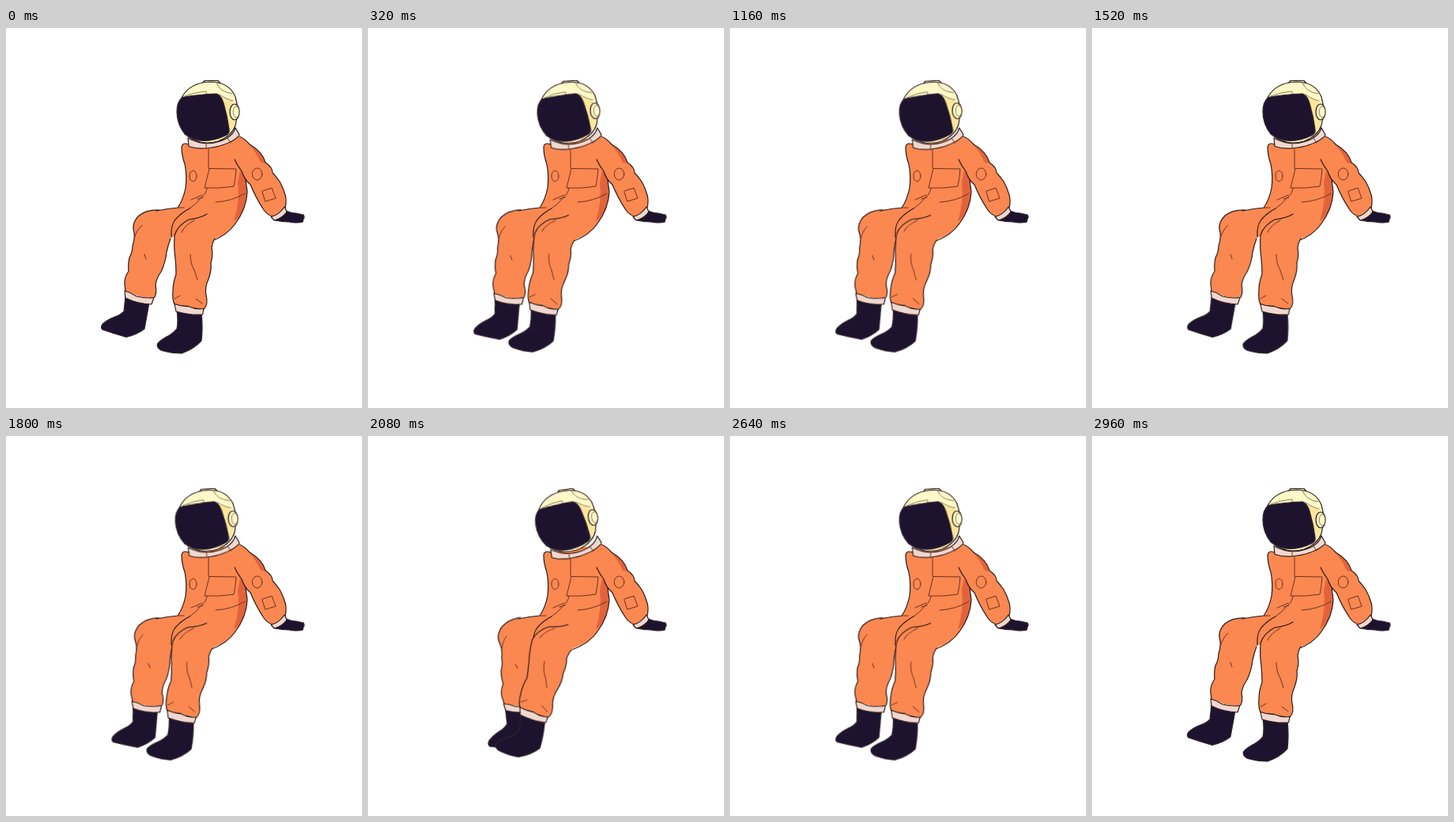
Animation, 450 px wide and 480 px high, one loop 3 s. Source, as an HTML page without scripts:

```html
<!DOCTYPE html>
<html lang="en">
<head>
<meta charset="utf-8">
<title>Sitting astronaut</title>
<style>
html, body { margin: 0; width: 100%; height: 100%; overflow: hidden; background: #fff; }
svg { display: block; width: 450px; height: 480px; }
path, ellipse { stroke-width: 1.2; stroke-linejoin: round; stroke-linecap: round; }
.suit { fill: #fb8850; stroke: none; }
.edge { fill: none; stroke: #2a1b1a; }
.fine { fill: none; stroke: #6b3323; stroke-width: 1; }
.shade { fill: #e2633b; stroke: none; }
.cuff { fill: #f1d8cf; stroke: #2a1b1a; }
.dark { fill: #1e132e; stroke: #30242b; }
.shell { fill: #fff8c8; stroke: #2a1b1a; }
.glow { fill: #fce69b; stroke: none; }
.trim { fill: none; stroke: #8d8058; stroke-width: 1; }

/* two swings of 1480 ms, then a 40 ms rest */
.swing { animation: swing 3s cubic-bezier(.364, 0, .636, 1) infinite; }
.leg-l { --turn: -13.4deg; transform-origin: 190px 236px; }
.leg-r { --turn: 11.3deg; transform-origin: 236px 230px; }
.head { --turn: -8deg; transform-origin: 262px 140px; }
.collar { --turn: -4.5deg; transform-origin: 292px 131px; }
@keyframes swing {
  0%, 49.333%, 98.667%, 100% { transform: rotate(0deg); }
  24.667%, 74% { transform: rotate(var(--turn)); }
}
</style>
</head>
<body>
<svg viewBox="0 0 450 480">
  <g class="swing leg-l">
    <path class="dark" d="M151 339L149 358Q144 363 137 365Q127 369 122 374Q119 378 122 381Q136 386 152 390.500Q166 387 175 380Q178 364 181 347Z"/>
    <path class="suit" d="M194 230Q178 229 168 237Q160 245 161 254Q164 264 160 275Q160 283 156 290Q154 299 155 307Q149 316 150 324L151 333Q160 335 168 339Q179 342 188 340Q191 334 189 325Q190 316 196 308Q202 295 203 283Q205 274 208 266L207 243Z"/>
    <path class="edge" d="M194 230Q178 229 168 237Q160 245 161 254Q164 264 160 275Q160 283 156 290Q154 299 155 307Q149 316 150 324L151 333M188 340Q191 334 189 325Q190 316 196 308Q202 295 203 283Q205 274 208 266"/>
    <path class="cuff" d="M150 332Q158 334 165 339Q177 342 187 340.500L184 349Q166 348.500 151 341Z"/>
    <path class="fine" d="M175 286L177 292M162 266Q165 255 172 249"/>
  </g>

  <path class="suit" d="M231 147Q223 144 222 150Q222 161 226 172Q229 187 227 202Q224 217 217 227Q204 228 191 231L189 240L209 265L214 262L230 268H259Q280 262 290 247Q304 228 305 207L303 192L309 198Q316 215 326 230Q331 237 338 238L353 227Q355 218 353 211Q350 201 346 194Q341 187 337 183Q337 176 328 170Q324 156 308 147Q301 139 295 137Z"/>
  <path class="shade" d="M303 192Q307 213 300 230Q296 239 288 244Q296 218 293 195L296 180ZM307 147Q324 156 328 171L322 170Q317 158 307 147Z"/>
  <path class="edge" d="M231 147Q223 144 222 150Q222 161 226 172Q229 187 227 202Q224 217 217 227Q204 228 190 231M258 270Q280 262 290 247Q304 228 305 207L303 192M295 137Q301 139 308 147Q324 156 328 170Q337 176 337 183Q341 187 346 194Q350 201 353 211Q355 218 353 227M338 238Q331 237 326 230Q316 215 309 198Q301 191 298 181Q292 173 289 166"/>
  <path class="fine" d="M256 153V177M257 177.500L291 178Q290 190 288 200Q270 203 251 202Q254 190 257 177.500ZM254 202Q253 210 247 214Q240 223 232 228M248 211L234 217M249 214L242 216M302 209Q285 219 265 220M217 227L225 227M324 206L336 202L341 215L328 219Z"/>
  <ellipse class="fine" cx="236.500" cy="187" rx="4.500" ry="6.800"/>
  <ellipse class="fine" cx="317.500" cy="184.500" rx="6.300" ry="7.500"/>
  <path class="edge" d="M209 264Q208 250 214 242Q222 233 232 228"/>
  <path class="dark" d="M340 241L354 231Q361 234 367 234L376 236Q378 239 376 241L375 245Q367 247 358 245Q349 245 340 243Z"/>
  <path class="cuff" d="M335 238.500Q345 236 352 226L355 232Q350 240 339 243Z"/>

  <g class="swing leg-r">
    <path class="dark" d="M216 357Q218 370 216 380Q210 387 203 390Q194 395 191.500 399Q190 404 197 407.500Q210 411 222 411Q238 405 247 395Q249 378 247 360Z"/>
    <path class="suit" d="M262 236Q245 240 231 242Q217 249 213 262Q212 278 214 291Q215 302 215 311Q211 322 211 332Q210 343 213 349Q222 352 230 351Q240 356 250 355Q256 350 253 338Q251 328 256 317Q260 306 259 297Q262 286 260 278Q261 270 266 264L269 250Z"/>
    <path class="edge" d="M254 235Q246 240 231 242Q217 249 213 262Q212 278 214 291Q215 302 215 311Q211 322 211 332Q210 343 213 349Q222 352 230 351M250 355Q256 350 253 338Q251 328 256 317Q260 306 259 297Q262 286 260 278Q261 270 264 266"/>
    <path class="cuff" d="M213 348.500Q222 352 230 351.500Q240 356 250 354.500L248.500 362Q231 363 215 358Z"/>
    <path class="fine" d="M233 286Q233 298 238 306M238 306L242 318M222 258Q226 249 238 243M213 342L220 338M248 348L240 342"/>
  </g>

  <g class="swing collar">
    <path class="cuff" d="M230 139Q254 152 278 140Q288 134 290 126L295 135Q290 143 270 149Q247 155 231 149.500Z"/>
    <path class="fine" d="M253 146V152M280 139L284 145"/>
  </g>

  <g class="swing head">
    <path class="shell" d="M248 70L251 66.500H268L271 70"/>
    <path class="shell" d="M222 88Q232 69 258 68Q282 68 290 87Q295 103 290 123Q285 137 268 143Q247 149 230 137Z"/>
    <path class="glow" d="M268 84Q277 90 286 92Q292 106 289 121Q283 138 262 143L281 134Z"/>
    <path class="trim" d="M226 86Q239 81 253 80V84M266 69Q270 81 286 83M270 84Q280 91 287 92"/>
    <path class="dark" d="M223 87.500Q245 83.500 266 83Q272 85 275 95Q280 112 282 128Q283 134 277 136Q264 142.500 250 142.500Q236 142 226 134Q216 121 216 106Q216 93 223 87.500Z"/>
    <ellipse class="shell" cx="289" cy="106" rx="6" ry="10"/>
    <ellipse class="trim" cx="291" cy="106" rx="3.800" ry="7"/>
  </g>
</svg>
</body>
</html>
```
